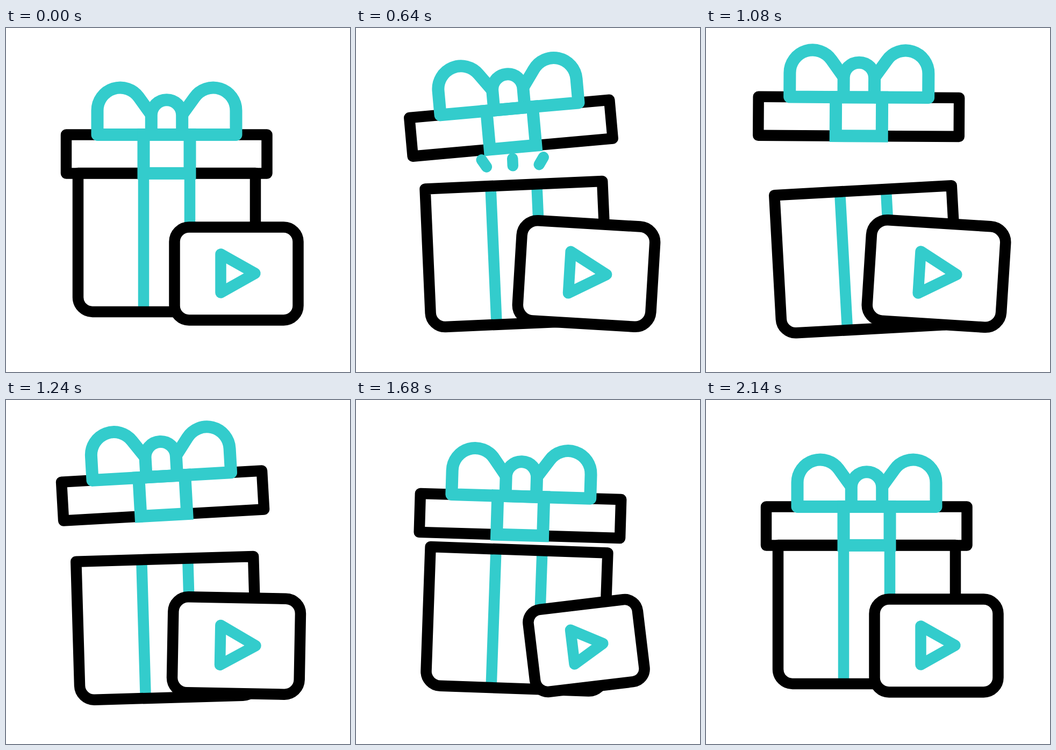
These frames come from a looping animation (640 by 640 pixels, 2220 ms). An HTML page:

```html
<!DOCTYPE html>
<html lang="en">
<head>
<meta charset="utf-8">
<title>Gift box</title>
<style>
  html, body { margin: 0; width: 100%; height: 100%; overflow: hidden; background: #fff; }
  svg { display: block; width: 100vw; height: 100vh; }
  g { fill: none; stroke: #000; stroke-width: 20.5; stroke-linejoin: round; }
  .teal { stroke: #3cc; }
  .wide { stroke-width: 23; }
</style>
</head>
<body>
<svg viewBox="0 0 640 640">
  <!-- the gift is drawn around the centre of its box -->
  <g id="gift">
    <path class="teal" d="M-43 -127V127M43 -127V127"/>
    <path d="M-165 -129H165V102A27 27 0 0 1 138 129H-138A27 27 0 0 1 -165 102Z"/>
    <g id="lid">
      <rect x="-187" y="-36" width="373.5" height="72"/>
      <g class="teal wide">
        <path d="M-28.5 -36H-129V-80.5A42.5 42.5 0 0 1 -51.5 -105L-28.5 -73"/>
        <path d="M28.5 -36H129V-80.5A42.5 42.5 0 0 0 51.5 -105L28.5 -73"/>
        <path d="M-28.7 -36V-72A28.7 28.7 0 0 1 28.7 -72V-36Z"/>
        <rect x="-43" y="-36" width="86" height="72" stroke-linejoin="miter"/>
      </g>
    </g>
    <path id="rays" class="teal" stroke-linecap="round"/>
  </g>
  <g id="card">
    <rect x="-115" y="-86.5" width="230" height="173" rx="27" fill="#fff"/>
    <path class="teal" d="M-29 -36.5V35.5L35 -.5Z"/>
  </g>
</svg>
<script>
const LOOP = 2220, STEP = 20, START = 20, PEAK = 940, END = 2140;
const [gift, lid, rays, card] = ['gift', 'lid', 'rays', 'card'].map(id => document.getElementById(id));

// Slow near rest, full speed at the other end
const soft = s => s * s * (2 - s);
const ramp = (t, a, b) => Math.min(1, Math.max(0, (t - a) / (b - a)));

// Linear between keys, soft when leaving and reaching rest
function track(...keys) {
  keys = [[START, 0], ...keys, [END, 0]];
  return t => {
    if (t <= START || t >= END) return 0;
    const i = keys.findIndex(k => t < k[0]);
    const [t0, v0] = keys[i - 1], [t1, v1] = keys[i];
    const s = (t - t0) / (t1 - t0);
    if (i === 1) return v1 * soft(s);
    if (i === keys.length - 1) return v0 * soft(1 - s);
    return v0 + (v1 - v0) * s;
  };
}

const lift = track([PEAK, 1]);
const tilt = track([PEAK, -4.15], [1080, -3.13], [1400, -.2], [1680, 2], [1730, 2.3]);
const lidTilt = track([440, -8.2], [580, -4.5], [640, -2.6], [PEAK, 8],
  [1080, 3.46], [1330, -4.4], [1400, -4.05], [1680, -.3]);
const cardTilt = track([PEAK, 5.7], [1080, 3.6], [1400, -1.5], [1680, -6.8], [1720, -7.3]);
const cardGrow = track([PEAK, .13], [1080, .086], [1400, -.028], [1680, -.11], [1720, -.115]);

function drawRays(t) {
  const tail = 30 * ramp(t, 680, 880), head = 30 * ramp(t, 545, 725);
  const shown = head > tail;
  const ray = (x, dx) => {
    const at = u => `${x + dx * u} ${-165 - .85 * u}`;
    return `M${at(tail)}L${at(head)}`;
  };
  rays.setAttribute('d', shown ? ray(-49, -.54) + ray(0, 0) + ray(49, .54) : '');
}

function draw(now) {
  const t = Math.floor(now % LOOP / STEP) * STEP;
  const up = lift(t), size = 1 + cardGrow(t);
  gift.setAttribute('transform', `translate(299 ${399 + 36.7 * up}) rotate(${tilt(t)})`);
  lid.setAttribute('transform', `translate(0 ${-164.6 - 117 * up}) rotate(${lidTilt(t)})`);
  card.setAttribute('transform', `translate(428.5 457) rotate(${cardTilt(t)}) scale(${size})`);
  card.style.strokeWidth = 20.5 / size;
  drawRays(t);
}

const begin = performance.now();
function tick() {
  draw(performance.now() - begin);
  requestAnimationFrame(tick);
}
tick();
</script>
</body>
</html>
```
